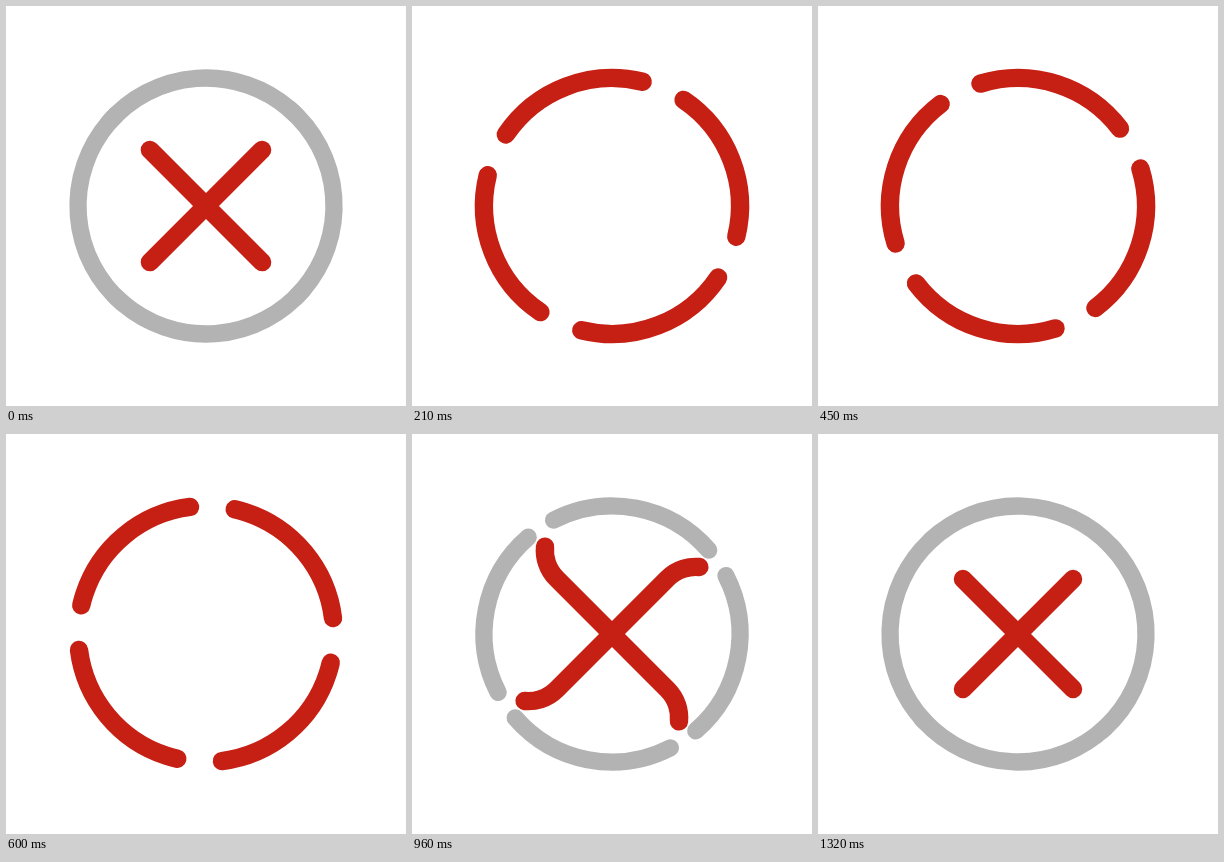
Animation of 400x400 px, one loop 1410 ms. Source, as an HTML page with a canvas:

```html
<!DOCTYPE html>
<html lang="en">
<head>
<meta charset="utf-8">
<style>
  html, body { margin: 0; width: 100%; height: 100%; overflow: hidden; background: #fff; }
  canvas { display: block; width: 400px; height: 400px; }
</style>
</head>
<body>
<canvas width="400" height="400"></canvas>
<script>
const ctx = document.querySelector('canvas').getContext('2d');
const LOOP = 1410, STEP = 30, LAST = 1320;
const RING = 128, BEND = 40, DASH = 156;
const ARM = Math.sqrt(RING * RING - 2 * RING * BEND); // where the arm starts to bend
const JOIN = Math.atan2(BEND, ARM);                   // where the bend meets the ring
const RAD = Math.PI / 180;

// Time in ms, distance travelled in px, speed in px/ms
const KEYS = [
  [0, 1, 0.1], [120, 95.7, 1.5], [330, 437.4, 1.25], [450, 561.6, 0.95],
  [750, 822, 0.85], [960, 967, 0.44], [1080, 999.4, 0.07], [LAST, 1002.6, 0]
];

// Out along the arm, once around the ring, back in along the same arm
const track = new Path2D();
track.moveTo(0, 0);
track.arc(ARM, -BEND, BEND, Math.PI / 2, -JOIN, true);
track.arc(0, 0, RING, -JOIN, JOIN, true);
track.arc(ARM, BEND, BEND, JOIN, -Math.PI / 2, true);
track.lineTo(0, 0);

function travel(t) {
  const i = Math.max(1, KEYS.findIndex(key => key[0] >= t));
  const [t0, p0, v0] = KEYS[i - 1], [t1, p1, v1] = KEYS[i];
  const d = t1 - t0, u = (t - t0) / d, w = 1 - u;
  return w * w * ((1 + 2 * u) * p0 + u * d * v0) + u * u * ((3 - 2 * u) * p1 - w * d * v1);
}

function greyArc(from, to) {
  if (from >= to) return;
  ctx.beginPath();
  ctx.arc(0, 0, RING, from * RAD, to * RAD);
  ctx.stroke();
}

function eachArm(paint) {
  for (let i = 0; i < 4; i++) {
    ctx.setTransform(1, 0, 0, 1, 200, 200);
    ctx.rotate((i * 90 - 45) * RAD);
    paint();
  }
}

function draw(t) {
  const s = travel(t);
  const turn = s / RING / RAD;
  const head = ARM + s, tail = Math.max(0, head - DASH);

  ctx.resetTransform();
  ctx.fillStyle = '#fff';
  ctx.fillRect(0, 0, 400, 400);
  ctx.lineCap = 'round';

  ctx.setLineDash([]);
  ctx.strokeStyle = '#b3b3b3';
  ctx.lineWidth = 17.3;
  eachArm(() => {
    greyArc(-94.4, 0.6 - turn);   // eaten ahead of the head
    greyArc(360.7 - turn, 4.1);   // restored behind the tail
  });

  ctx.setLineDash([head - tail, 5000]);
  ctx.lineDashOffset = -tail;
  ctx.strokeStyle = '#c61f14';
  ctx.lineWidth = 18.4;
  eachArm(() => ctx.stroke(track));
}

const start = performance.now();
function tick() {
  const t = (performance.now() - start) % LOOP;
  draw(Math.min(LAST, Math.floor(t / STEP) * STEP));
  requestAnimationFrame(tick);
}
tick();
</script>
</body>
</html>
```
